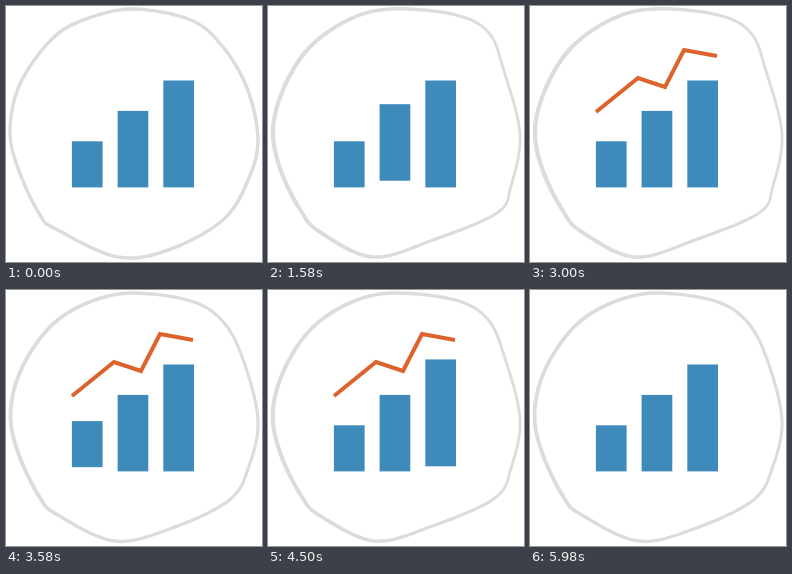
Write an HTML page with a canvas that moves like this. It is 256x256 px and loops after 6000 ms.

```html
<!DOCTYPE html>
<html lang="en">
<head>
<meta charset="utf-8">
<title>Bar chart</title>
<style>
html, body { margin: 0; width: 100%; height: 100%; overflow: hidden; background: #fff; }
canvas { display: block; width: 100vw; height: 100vh; }
</style>
</head>
<body>
<canvas id="stage" width="256" height="256"></canvas>
<script>
const ctx = document.getElementById('stage').getContext('2d');
const LOOP = 6000, HOLD = 200;
const HOP = 540, HOP_STARTS = [590, 3090], HOP_SIZE = 7.8;
const TREND = [[66, 106], [108, 72], [135, 81], [154, 44], [187, 50]];

// Two matching outlines; the ring wobbles by mixing them in steps.
const ROUND = [
  [127, 3], [185, 14], [217, 41], [241, 82], [252, 132], [243, 172], [218, 213], [165, 243],
  [112, 251], [50, 223], [34, 209], [13, 165], [4, 125], [14, 78], [46, 33], [80, 13]
];
const LUMPY = [
  [124, 3], [188, 9], [221, 27], [236, 65], [252, 128], [243, 180], [229, 207], [165, 234],
  [105, 251], [52, 226], [33, 205], [13, 165], [5, 125], [15, 84], [40, 43], [80, 14]
];
const RINGS = [0, 0.5, 0.8, 1].map(ringPath);

function ringPath(mix) {
  const pts = ROUND.map((p, i) => p.map((v, k) => v + (LUMPY[i][k] - v) * mix));
  const n = pts.length, path = new Path2D();
  for (const side of [0.5, -0.5]) {
    addCurve(path, pts.map(([x, y], i) => {
      const a = pts[(i + n - 1) % n], b = pts[(i + 1) % n];
      const dx = b[0] - a[0], dy = b[1] - a[1], len = Math.hypot(dx, dy);
      const width = 3.5 + mix * (128 - x) / 160;
      return [x + dy / len * width * side, y - dx / len * width * side];
    }));
  }
  return path;
}

function addCurve(path, pts) {
  const n = pts.length, at = i => pts[(i + n) % n];
  path.moveTo(...pts[0]);
  for (let i = 0; i < n; i++) {
    const a = at(i - 1), b = at(i), c = at(i + 1), d = at(i + 2);
    path.bezierCurveTo(
      b[0] + (c[0] - a[0]) / 6, b[1] + (c[1] - a[1]) / 6,
      c[0] - (d[0] - b[0]) / 6, c[1] - (d[1] - b[1]) / 6,
      c[0], c[1]);
  }
  path.closePath();
}

function ramp(t, from, to) {
  const u = Math.min(1, Math.max(0, (t - from) / (to - from)));
  return u * u * (3 - 2 * u);
}

function barShift(t, i) {
  for (const start of HOP_STARTS) {
    const u = (t - start) / HOP - i;
    if (u > 0 && u < 1) return HOP_SIZE * Math.sin(2 * Math.PI * u);
  }
  return 0;
}

function drawBars(t) {
  ctx.fillStyle = '#3e8abb';
  for (let i = 0; i < 3; i++) {
    ctx.fillRect(65.9 + 45.7 * i, 135.3 - 30.4 * i + barShift(t, i), 30.7, 46.1 + 30.4 * i);
  }
}

// Every stretch of the trend line grows from its own middle.
function drawTrend(grow) {
  if (grow <= 0) return;
  ctx.beginPath();
  if (grow === 1) {
    TREND.forEach(p => ctx.lineTo(...p));
  } else {
    for (let i = 1; i < TREND.length; i++) {
      const [ax, ay] = TREND[i - 1], [bx, by] = TREND[i];
      const mx = (ax + bx) / 2, my = (ay + by) / 2;
      ctx.moveTo(mx + (ax - mx) * grow, my + (ay - my) * grow);
      ctx.lineTo(mx + (bx - mx) * grow, my + (by - my) * grow);
    }
  }
  ctx.strokeStyle = '#dc642c';
  ctx.lineWidth = 4;
  ctx.stroke();
}

function draw(now) {
  const t = now % LOOP;
  ctx.fillStyle = '#fff';
  ctx.fillRect(0, 0, 256, 256);
  ctx.fillStyle = '#dcdcdc';
  ctx.fill(RINGS[Math.floor(t / HOLD) % RINGS.length], 'evenodd');
  drawBars(t);
  drawTrend(ramp(t, 2370, 2840) - ramp(t, 5370, 5600));
  requestAnimationFrame(draw);
}
requestAnimationFrame(draw);
</script>
</body>
</html>
```
